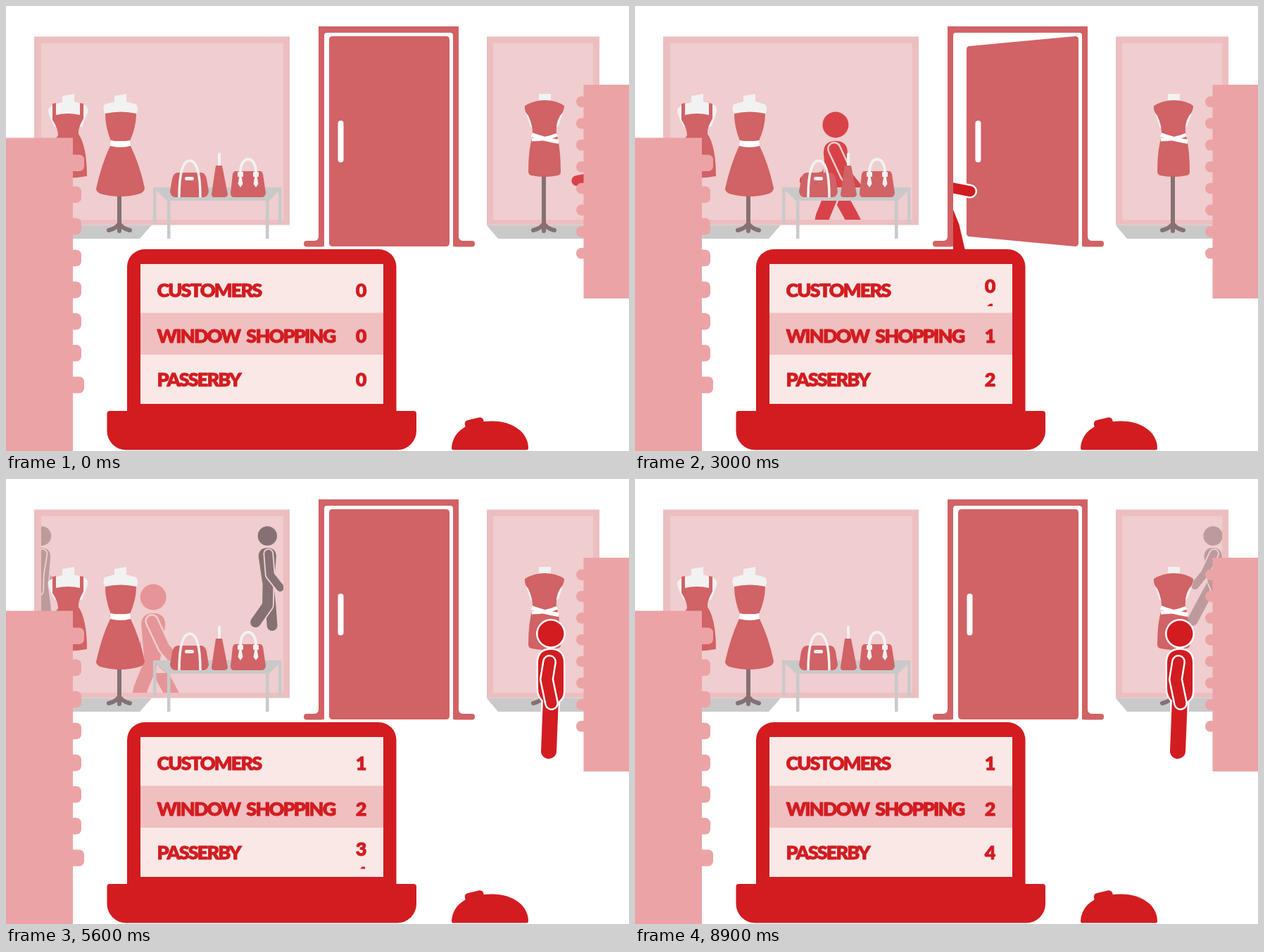
Write an HTML page with a canvas that moves like this. It is 885 by 633 pixels and loops after 9000 ms.

```html
<!DOCTYPE html>
<html lang="en">
<head>
<meta charset="utf-8">
<title>Shop visitors</title>
<style>
html, body { margin: 0; height: 100%; overflow: hidden; background: #fff; }
canvas { display: block; }
</style>
</head>
<body>
<canvas id="stage" width="885" height="633"></canvas>
<script>
const c = document.getElementById('stage').getContext('2d');
const RED = '#d21c20', ROSE = '#d16265', GLASS = '#f0cdcf', FRAME = '#edbec0',
  PANEL = '#eca3a6', GREY = '#c9c9c9', PALE = '#f2f2f2', STAND = '#857173', WHITE = '#fff';
const LOOP = 9000, PACE = 0.1897;
const sin = a => Math.sin(a * Math.PI / 180), cos = a => Math.cos(a * Math.PI / 180);

function ease(t, start, length) {
  const p = Math.min(1, Math.max(0, (t - start) / length));
  return p * p * (3 - 2 * p);
}
function fill(color, d) {
  c.fillStyle = color;
  c.fill(new Path2D(d));
}
function box(color, x, y, w, h, r = 0) {
  c.fillStyle = color;
  c.beginPath();
  c.roundRect(x, y, w, h, r);
  c.fill();
}
function line(color, width, d, cap = 'butt') {
  c.strokeStyle = color;
  c.lineWidth = width;
  c.lineCap = cap;
  c.lineJoin = 'round';
  c.stroke(new Path2D(d));
}
function clipped(x, y, w, h, draw) {
  c.save();
  c.beginPath();
  c.rect(x, y, w, h);
  c.clip();
  draw();
  c.restore();
}

// People: the origin is the centre of the head, facing right.
function limb(points, width, color, edge) {
  const d = 'M' + points.join('L');
  line(edge, width + 5, d, 'round');
  line(color, width, d, 'round');
}
function joint(x, y, upper, a, lower, b) {
  const mx = x + upper * sin(a), my = y + upper * cos(a);
  return [[x, y], [mx, my], [mx + lower * sin(b), my + lower * cos(b)]];
}
function arm(phase) {
  const s = Math.cos(phase);
  return joint(2, 34, 41, s > 0 ? 15 * s : 25 * s, 31, 20 + 59 * s);
}
function leg(phase) {
  const s = Math.cos(phase), lift = Math.max(0, -Math.sin(phase)) * 28;
  return joint(1, 88, 45, (s > 0 ? 22 : 29) * s + lift * 0.3, 40, (s > 0 ? 13 : 27) * s - lift);
}
function head(color, edge) {
  limb([[0, 0], [0, 0.01]], 37, color, edge);
}
function place(x, y, scale, facing, draw) {
  c.save();
  c.translate(x, y);
  c.scale(scale * facing, scale);
  draw();
  c.restore();
}
// Each leg swings against the arm on its own side.
function walker(x, y, scale, facing, color, edge, phase) {
  const torso = 'M-17 40Q-17 23 0 23Q17 23 17 40L13 88Q11 96 0 96Q-9 96 -10 88Z';
  const far = phase + Math.PI;
  place(x, y, scale, facing, () => {
    limb(arm(far), 16, color, edge);
    line(edge, 5, torso);
    limb(leg(phase), 20, color, edge);
    limb(leg(far), 20, color, edge);
    fill(color, torso);
    limb(arm(phase), 15, color, edge);
    head(color, edge);
  });
}
function shopper(x, y, color, edge) {
  place(x, y, 1, 1, () => {
    for (const side of [-1, 1])
      limb([[18 * side, 36], [29 * side, 68], [35 * side, 97]], 16, color, edge);
    box(edge, -24, 21, 48, 90, 18);
    box(color, -22, 23, 44, 88, 16);
    box(color, -20, 90, 19, 90);
    box(color, 3, 90, 17, 90);
    head(color, edge);
  });
}
function standing(x, y) {
  const torso = 'M-18 42Q-18 23 0 23Q18 23 18 42V82Q18 93 9 97H-9Q-18 90 -18 78Z';
  place(x, y, 1, 1, () => {
    line(WHITE, 5, torso);
    limb([[0, 92], [-3, 167]], 22, RED, WHITE);
    fill(RED, torso);
    limb([[-2, 40], [-6, 65], [1, 99]], 15, RED, WHITE);
    head(RED, WHITE);
  });
}

function street(t) {
  const first = 854 - PACE * t;
  walker(first, 169, 1, -1, '#d84349', GLASS, Math.PI * (854 - first) / 114);

  const dark = 233 + 0.1976 * (t - 4900);
  walker(dark, 81, 0.74, 1, STAND, GLASS, Math.PI * (1 + (dark - 233) / 98.8));
  const light = 214 + 0.2335 * (t - 6300);
  walker(light, 81, 0.74, 1, '#bd9a9c', GLASS, Math.PI * (1 + (light - 214) / 101));

  const tint = '#e59598';
  if (t >= 4300 && t <= 4900) shopper(342, 168, tint, GLASS);
  else {
    const x = 342 - PACE * (t - (t < 4300 ? 4300 : 4900));
    walker(x, 168, 1, -1, tint, GLASS, Math.PI * (342 - x) / 133);
  }
}

function pole(x, top) {
  box(STAND, x - 3, top, 6, 318 - top);
  line(STAND, 6, `M${x} 309Q${x - 3} 316 ${x - 15} 319M${x} 309Q${x + 3} 316 ${x + 15} 319M${x} 309V320`, 'round');
}
function mannequins() {
  fill(PALE, 'M80 128L97 125V136L113 141Q118 146 115 154L108 172H69Q61 158 60 148Q61 141 80 137Z');
  fill(ROSE, 'M66 139L71 138V155Q88 151 105 155V138L110 139V160Q102 174 103 182Q115 200 115 242Q88 247 62 242Q62 198 74 184Q74 174 66 162Z');

  pole(161, 268);
  fill(PALE, 'M154 128L171 125V136L185 140Q190 146 184 156H142Q136 146 140 140L154 136Z');
  fill(ROSE, 'M141 153Q163 148 185 153Q185 172 176 192H149Q141 172 141 153ZM148 199H177Q190 226 197 259Q197 264 190 267Q163 275 134 267Q128 264 128 260Q136 224 148 199Z');
  fill(WHITE, 'M149 191Q163 194 176 191L177 199Q163 203 148 199Z');

  pole(764, 240);
  box(PALE, 757, 125, 17, 14, 1);
  fill(PALE, 'M737 147L745 172L750 176V150ZM793 147L785 170L779 174V150Z');
  fill(ROSE, 'M737 142Q750 134 765 134Q782 134 793 142Q793 151 787 156Q779 170 783 185Q788 205 788 236Q788 240 784 241Q765 245 746 241Q742 240 742 235Q742 204 748 185Q749 171 742 156Q736 150 737 142Z');
  line(WHITE, 6, 'M747 183Q765 190 785 193');
  line(WHITE, 5, 'M747 190Q768 190 783 183');
}
function display() {
  fill(GREY, 'M209 258H392L374 277H229Z');
  for (const [x, y, h] of [[209, 258, 53], [387, 258, 53], [229, 272, 59], [369, 272, 59]])
    box(GREY, x, y, 4.5, h);
  fill(GLASS, 'M214 264L227 276H214ZM387 264L376 276H387Z');

  fill(ROSE, 'M245 237H277Q283 237 285 246L288 264Q287 271 281 272H240Q234 271 233 264L236 246Q238 237 245 237Z');
  line(PALE, 3.5, 'M246 272C246 235 252 220 261 220C270 220 276 235 276 272');
  box(PALE, 254, 243, 13, 5, 2.5);
  box(PALE, 301, 209, 4, 20, 1);
  fill(ROSE, 'M298 227H307L315 268Q314 272 310 272H296Q292 272 292 268Z');
  fill(ROSE, 'M325 235H362Q364 236 365 239L369 266Q368 272 363 272H324Q319 272 319 266L322 239Q323 236 325 235Z');
  line(PALE, 4, 'M333 238C333 224 338 218 344 218C350 218 355 224 355 238');
  for (const x of [333, 355]) {
    box(PALE, x - 4, 236, 8, 7, 1);
    fill(PALE, `M${x - 1.5} 242H${x + 1.5}L${x + 3.5} 253L${x} 258L${x - 3.5} 253Z`);
  }
}
function door(t) {
  const turn = 68 * (ease(t, 2700, 800) - ease(t, 3700, 800));
  const left = 630 - 171 * cos(turn), inset = 38 * sin(turn);
  box(ROSE, 444, 29, 199, 310);
  box(ROSE, 423, 334, 29, 8.5, 4);
  box(ROSE, 635, 334, 31, 8.5, 4);
  fill(ROSE, 'M438 334Q444 334 444 327H452V342H438ZM649 334Q643 334 643 327H635V342H649Z');
  box(WHITE, 452, 38, 183, 306, [4, 4, 0, 0]);
  const top = 43 + inset, bottom = 342 - inset;
  fill(ROSE, `M${left + 5} ${top}L625 43Q630 43 630 48V337Q630 342 625 342L${left + 5} ${bottom}Q${left} ${bottom} ${left} ${bottom - 5}V${top + 5}Q${left} ${top} ${left + 5} ${top}Z`);
  box(WHITE, left + 12.5, 163, 8, 59.5, 4);
}
function customer(t) {
  const x = 433 + PACE * (t - 3000);
  if (x < 380) return;
  clipped(452, 0, 433, 633, () => {
    if (x >= 774) standing(774, 220);
    else walker(x, 184 + 36 * (x - 433) / 341, 1, 1, RED, WHITE, Math.PI * (x - 433) / 114);
  });
}

function write(text, x, y) {
  c.fillStyle = c.strokeStyle = RED;
  c.lineWidth = 0.8;
  c.fillText(text, x, y);
  c.strokeText(text, x, y);
}
function counter(label, base, t, starts) {
  c.font = '900 27px Lato, sans-serif';
  c.letterSpacing = '-1.9px';
  c.wordSpacing = '5px';
  c.textAlign = 'left';
  write(label, 214.5, base);
  c.letterSpacing = '0px';
  c.textAlign = 'center';
  const value = starts.reduce((sum, start) => sum + ease(t, start, 800), 0);
  clipped(480, base - 29, 50, 42.5, () => {
    for (let n = 0; n <= starts.length; n++)
      write(n, 504.5, base + (n - value) * 35);
  });
}
function laptop(t) {
  box(RED, 172, 346, 382.5, 235, [25, 25, 0, 0]);
  box(RED, 143.5, 576, 439.5, 55.5, [4, 4, 27, 27]);
  box('#fae8e7', 191, 367, 345, 199);
  box('#f0bfc0', 191, 436.5, 345, 59.5);
  counter('CUSTOMERS', 413.5, t, [2800]);
  counter('WINDOW SHOPPING', 478.5, t, [2200, 4000]);
  counter('PASSERBY', 541, t, [0, 1700, 3900, 5400]);
  fill(RED, 'M633 628C635 605 655 590.5 690 590.5C722 590.5 742 608 742 629Q742 631.5 739 631.5H635Q633 631.5 633 628Z');
  c.save();
  c.translate(666, 594);
  c.rotate(-0.23);
  box(RED, -14, -7, 27, 15, 5);
  c.restore();
}
function panels() {
  box(PANEL, 0, 187.5, 95, 446);
  box(PANEL, 820.5, 112, 65, 304);
  for (let i = 0; i < 8; i++) {
    box(PANEL, 85, 211.5 + 45.1 * i, i % 7 ? 22 : 26, 23.5, 7);
    box(PANEL, 810, 128.5 + 30.8 * i, 20, 15.5, 7.5);
  }
}

function draw(t) {
  box(WHITE, 0, 0, 885, 633);
  box(FRAME, 40, 43.5, 363, 268);
  box(FRAME, 683, 43.5, 160, 268);
  fill(GREY, 'M40 311.5H207L190 331H40ZM683 312L699 331H843V311.5H683Z');
  for (const [x, w] of [[50, 344], [692, 142]]) {
    box(GLASS, x, 53, w, 251);
    clipped(x, 53, w, 251, () => street(t));
  }
  display();
  mannequins();
  door(t);
  customer(t);
  laptop(t);
  panels();
}

const begin = performance.now();
function tick() {
  const t = (performance.now() - begin) % LOOP;
  draw(Math.floor(t / 100) * 100);
  requestAnimationFrame(tick);
}
tick();
</script>
</body>
</html>
```
